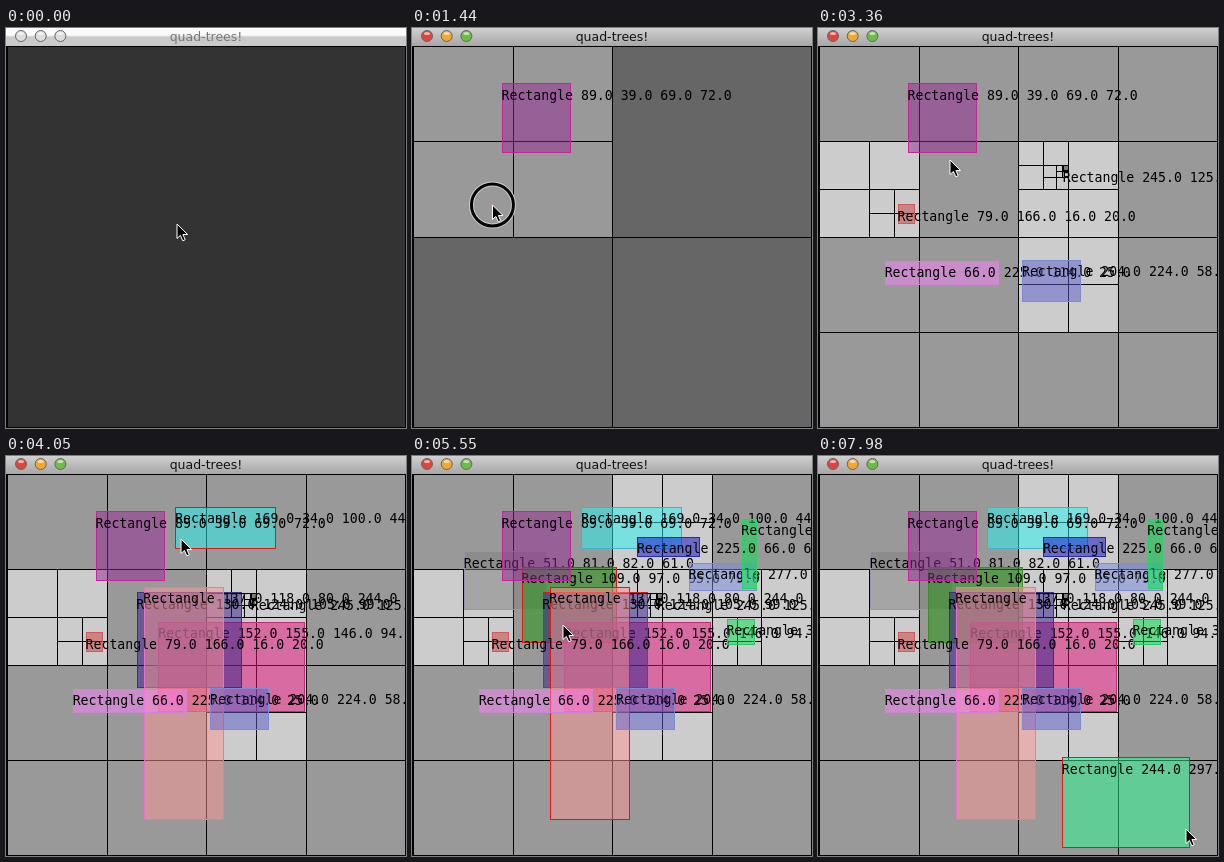
An HTML page that plays this animation: 400x400 px, repeating every 8 s.

```html
<!DOCTYPE html>
<html lang="en">
<head>
<meta charset="utf-8">
<title>quad-trees!</title>
<style>
  html, body { margin: 0; width: 100%; height: 100%; overflow: hidden; background: #000; }
  svg { display: block; width: 100vw; height: 100vh; }
  .label { font: 13.2px "DejaVu Sans Mono", monospace; white-space: pre; }
  .title { font: 12.5px "DejaVu Sans", sans-serif; text-anchor: middle; }
  .cell { stroke: #000; shape-rendering: crispEdges; }
  .box { fill-opacity: .5; shape-rendering: crispEdges; }
</style>
</head>
<body>
<svg viewBox="0 0 400 400">
  <defs>
    <linearGradient id="active" x2="0" y2="1">
      <stop offset="0" stop-color="#d0d0d0"/><stop offset="1" stop-color="#a6a6a6"/>
    </linearGradient>
    <linearGradient id="idle" x2="0" y2="1">
      <stop offset=".4" stop-color="#fafafa"/><stop offset=".5" stop-color="#cacaca"/>
    </linearGradient>
  </defs>
  <rect width="400" height="400"/>
  <g id="grid"></g>
  <g id="boxes"></g>
  <rect id="bar" width="400" height="18"/>
  <g id="lights"></g>
  <text id="title" class="title" x="200" y="12.5">quad-trees!</text>
  <g id="mouse">
    <g id="ring" fill="none">
      <circle r="21" stroke="#ccc" stroke-width="5"/>
      <circle r="21" stroke="#000" stroke-width="3"/>
    </g>
    <path d="M0 0V14.5L3.4 11.4L5.8 16.8L8.2 15.7L5.9 10.5H10.6Z" stroke="#fff"/>
  </g>
</svg>
<script>
const NS = "http://www.w3.org/2000/svg";
const LOOP = 8000, SIZE = 400, MAX_DEPTH = 6;
const $ = id => document.getElementById(id);

// Canvas coordinates to window pixels
const SX = 0.995, SY = 0.953;
const px = x => 1.7 + x * SX;
const py = y => 18.6 + y * SY;

// In painting order: x, y, w, h, fill, stroke, press time, release time, dragged leftwards
const items = [
  [51, 81, 82, 61, "#808080", "#9b91b4", 5160, 5280],
  [109, 97, 95, 79, "#1e960a", "#3c8c28", 4900, 5020],
  [152, 155, 146, 94, "#e10f78", "#c32878", 3570, 3680],
  [130, 124, 105, 99, "#321e8c", "#3c3278", 3400, 3500],
  [137, 118, 80, 244, "#ff9696", "#ee6ecb", 3730, 3840],
  [169, 34, 100, 44, "#28f5f5", "#40b4c4", 3910, 4020, true],
  [89, 39, 69, 72, "#962896", "#c2269a", 900, 1200],
  [277, 93, 68, 29, "#788ce1", "#828cd2", 4640, 4740],
  [330, 47, 15, 73, "#00e650", "#28d264", 4480, 4560],
  [66, 225, 114, 25, "#fa82fa", "#d084d4", 1900, 2150],
  [244, 297, 128, 94, "#2dff96", "#50c88c", 7470, 7900],
  [225, 66, 62, 20, "#0a0ac8", "#2828b4", 4130, 4240],
  [204, 224, 58, 43, "#5f5fcd", "#7a8ccd", 2350, 2600],
  [79, 166, 16, 20, "#cd3c3c", "#d05a5a", 1430, 1620],
  [315, 152, 28, 26, "#00e650", "#28c864", 4320, 4400],
  [245, 125, 5, 5, "#333333", "#000000", 2950, 3050]
].map(([x, y, w, h, fill, stroke, press, release, flip]) =>
  ({ x, y, w, h, fill, stroke, press, release, flip }));

// Pointer path in window pixels: free moves plus every drag
const path = [
  [0, 171, 196], [500, 171, 196], [1400, 79, 176], [3360, 132, 132], [4050, 175, 83],
  [5550, 151, 169], [5800, 175, 250], [6100, 225, 190], [6350, 250, 90],
  [6630, 115, 87], [6760, 115, 87], [7230, 236, 284], [7410, 236, 284],
  [7970, 368, 373], [LOOP, 368, 373]
];
for (const r of items) {
  const [from, to] = r.flip ? [r.x + r.w, r.x] : [r.x, r.x + r.w];
  path.push([r.press, px(from), py(r.y)], [r.release, px(to), py(r.y + r.h)]);
}
path.sort((a, b) => a[0] - b[0]);

function pointer(t) {
  const i = path.findIndex(p => p[0] > t);
  const [t0, x0, y0] = path[i - 1], [t1, x1, y1] = path[i];
  const u = (t - t0) / (t1 - t0), k = u * u * (3 - 2 * u);
  return [x0 + (x1 - x0) * k, y0 + (y1 - y0) * k];
}

const node = (x, y, size, depth) => ({ x, y, size, depth, kids: null });
const holds = (n, r) =>
  r.x >= n.x && r.y >= n.y && r.x + r.w <= n.x + n.size && r.y + r.h <= n.y + n.size;

function insert(n, r) {
  if (n.depth >= MAX_DEPTH) return;
  const s = n.size / 2;
  n.kids ||= [0, 1, 2, 3].map(i =>
    node(n.x + (i & 1) * s, n.y + (i >> 1) * s, s, n.depth + 1));
  const kid = n.kids.find(k => holds(k, r));
  if (kid) insert(kid, r);
}

function cells(n) {
  if (n.kids) return n.kids.map(cells).join("");
  const g = Math.min(51 * (n.depth + 1), 204);
  return `<rect class="cell" x="${px(n.x)}" y="${py(n.y)}" width="${n.size * SX}"
    height="${n.size * SY}" fill="rgb(${g},${g},${g})"/>`;
}

function set(el, attrs) {
  for (const k in attrs) el.setAttribute(k, attrs[k]);
  return el;
}
const add = (parent, tag, attrs) =>
  parent.appendChild(set(document.createElementNS(NS, tag), attrs));

for (const r of items) {
  r.box = add($("boxes"), "rect", { class: "box", fill: r.fill });
  r.label = add($("boxes"), "text", { class: "label", x: px(r.x) - 0.7, y: py(r.y) + 16 });
  r.label.textContent = "Rectangle " + [r.x, r.y, r.w, r.h].map(v => v.toFixed(1)).join(" ");
}
const lights = ["#e0443c", "#f0a830", "#6cbc48"].map((color, i) => {
  const cx = 15 + i * 19.7;
  const dot = add($("lights"), "circle", { cx, cy: 8, r: 5.5, stroke: "#666" });
  add($("lights"), "ellipse", { cx, cy: 5.5, rx: 3, ry: 1.6, fill: "#fff", opacity: .6 });
  return { dot, color };
});

let shown = -1;
function drawGrid(t) {
  const placed = items.filter(r => t >= r.release);
  if (placed.length === shown) return;
  shown = placed.length;
  const root = node(0, 0, SIZE, 0);
  placed.forEach(r => insert(root, r));
  $("grid").innerHTML = cells(root);
}

function drawBox(r, t, mx, my) {
  const done = t >= r.release;
  r.box.style.display = t > r.press ? "" : "none";
  r.label.style.display = done ? "" : "none";
  if (t <= r.press) return;
  let x = px(r.x), y = py(r.y), w = r.w * SX, h = r.h * SY;
  const hover = mx >= x && mx <= x + w && my >= y && my <= y + h;
  if (!done) {
    if (r.flip) {
      w = x + w - mx;
      x = mx;
    } else w = mx - x;
    h = my - y;
  }
  set(r.box, { x, y, width: Math.max(0, w), height: Math.max(0, h),
    stroke: done && hover ? "#e81414" : r.stroke });
}

function draw(t) {
  const [mx, my] = pointer(t);
  const active = t >= 30;
  set($("bar"), { fill: `url(#${active ? "active" : "idle"})` });
  set($("title"), { fill: active ? "#111" : "#777" });
  for (const { dot, color } of lights) set(dot, { fill: active ? color : "#ddd" });
  drawGrid(t);
  for (const r of items) drawBox(r, t, mx, my);
  set($("mouse"), { transform: `translate(${mx} ${my})` });
  const down = items.some(r => t >= r.press && t < r.release);
  $("ring").style.display = down ? "" : "none";
}

const start = performance.now();
function tick() {
  draw((performance.now() - start) % LOOP);
  requestAnimationFrame(tick);
}
tick();
</script>
</body>
</html>
```
